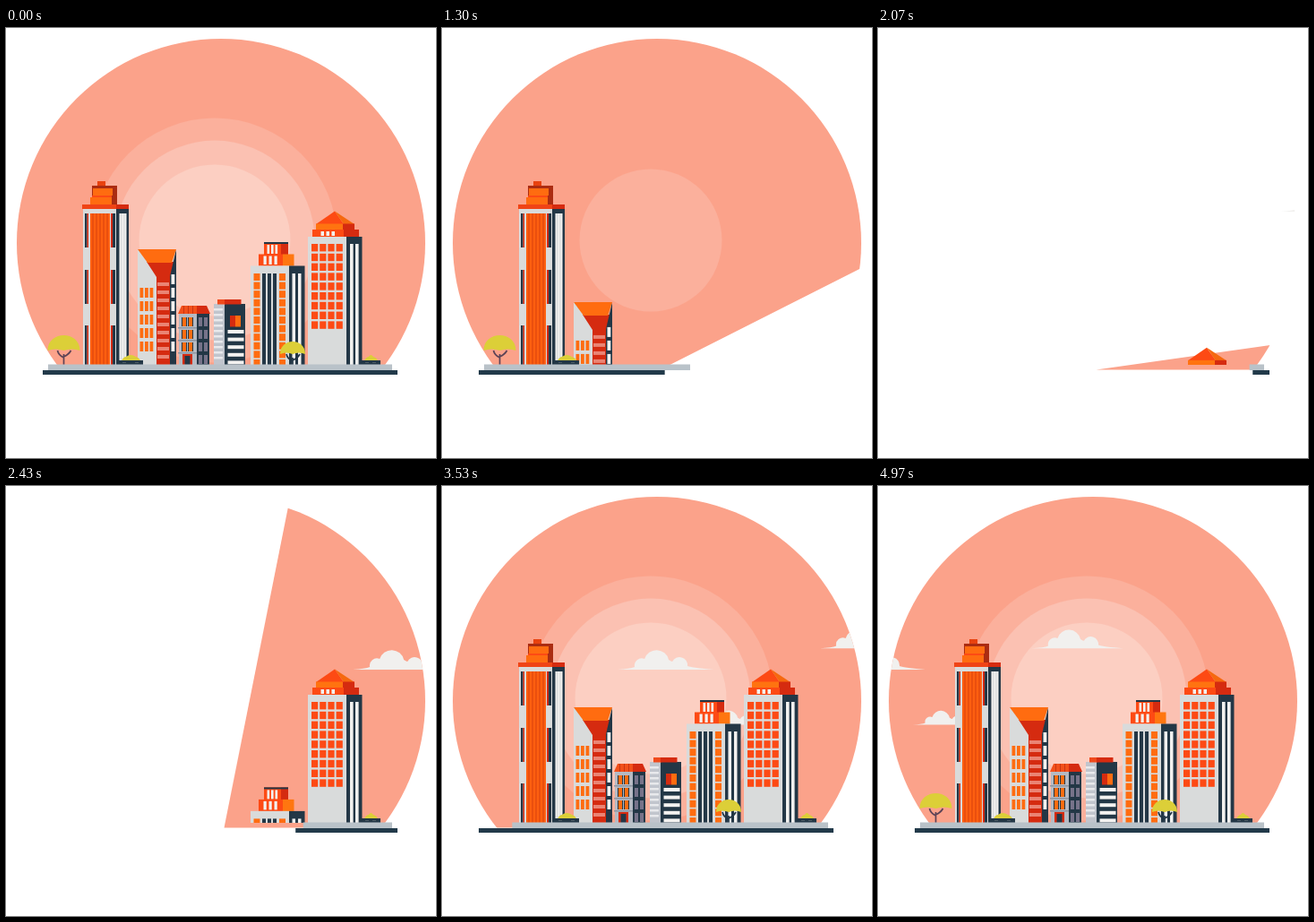
Recreate the animation shown at these times as an HTML page. Size 480x480 px, loop 5.01 s.

```html
<!DOCTYPE html>
<html lang="en">
<head>
<meta charset="utf-8">
<title>City skyline</title>
<style>
  html, body { margin: 0; width: 100%; height: 100%; overflow: hidden; background: #fff; }
  svg { display: block; width: 100vw; height: 100vh; }
</style>
</head>
<body>
<svg viewBox="0 0 480 480">
  <defs>
    <clipPath id="wedge"><path id="sweep"/></clipPath>
    <clipPath id="disc"><circle cx="240" cy="240" r="228"/></clipPath>
    <clipPath id="above"><rect width="480" height="376"/></clipPath>
    <path id="cloud" d="M0 23Q14 22 19 20A8 8 0 0 1 30 11A14 14 0 0 1 57 12Q60 14 61 14A9 9 0 0 1 78 19Q84 21 107 23Z"/>
  </defs>
  <g clip-path="url(#wedge)">
    <circle cx="240" cy="240" r="228" fill="#fba28a"/>
    <circle class="sun" cx="233" cy="237" fill="#fbb09c"/>
    <circle class="sun" cx="233" cy="237" fill="#fbc1b2"/>
    <circle class="sun" cx="233" cy="237" fill="#fccfc2"/>
  </g>
  <g clip-path="url(#disc)" fill="#f1f0ee">
    <g id="clouds">
      <use href="#cloud" y="182"/>
      <use href="#cloud" transform="translate(226 159.5) scale(.95)"/>
      <use href="#cloud" transform="translate(93 250) scale(.72)"/>
    </g>
  </g>
  <g id="city" clip-path="url(#above)"></g>
  <rect id="kerb" y="375.5" height="6.5" fill="#b9c2c9"/>
  <rect id="road" y="382" height="5" fill="#223a4a"/>
</svg>
<script>
const LOOP = 5010, TURN = 2000;
const navy = '#233746', grey = '#d9dbdb', white = '#f3f2f0', red = '#d52b10',
      flame = '#fd4a14', orange = '#ff6c10', maroon = '#ab2c12', lime = '#dccf38';
const $ = id => document.getElementById(id);

const rect = (fill, x, y, w, h) => `<rect x="${x}" y="${y}" width="${w}" height="${h}" fill="${fill}"/>`;
const poly = (fill, points) => `<polygon points="${points}" fill="${fill}"/>`;
const rows = (n, step, draw) => Array.from({ length: n }, (_, i) => draw(i * step)).join('');
const grid = (fill, xs, y, w, h, n, step) =>
  rows(n, step, d => xs.map(x => rect(fill, x, y + d, w, h)).join(''));

const columnTower = () =>
  rect('#e8420f', 102, 171, 9, 5) + rect(maroon, 96, 176, 28, 21) +
  rect(orange, 97, 179, 22, 8) + rect(orange, 94, 189, 24, 8) + rect(flame, 96, 187, 22, 2) +
  rect(grey, 86, 202, 37, 174) +
  [[207, 38], [270, 38], [332, 44]].map(([y, h]) =>
    rect(navy, 88, y, 2.5, h) + rect(red, 90.5, y, 1.5, h) +
    rect(red, 117, y, 2, h) + rect(navy, 119, y, 3, h)).join('') +
  rect('#fd5f10', 94, 207, 22, 169) +
  rows(5, 4, d => rect('#d8400c', 96.5 + d, 207, 1, 169)) +
  rect(navy, 123, 202, 14, 174) + rect(white, 126.5, 207, 8, 169) +
  rows(2, 3, d => rect('#c4c8cb', 128.5 + d, 207, .8, 169)) +
  rect('#f04416', 85, 197, 38, 5) + rect(red, 123, 197, 14, 5);

const foldTower = () =>
  rect(grey, 147, 247, 21, 129) +
  poly(red, '157,261 188,261 183,278 183,376 168,376 168,278') +
  poly(navy, '190,247 190,376 183,376 183,277') +
  poly(orange, '147,247 190,247 185,262 158,262') +
  grid('#ea8474', [169], 284, 13, 4, 10, 9) +
  grid(orange, [149.5, 155, 160.5], 290, 3.8, 11, 5, 15) +
  grid(white, [184.5], 275, 3.8, 11, 6, 15);

const townHouse = () =>
  rect('#b5bac3', 193, 319, 20, 57) + rect(navy, 213, 319, 14, 57) +
  poly('#f2501a', '196,310 213,310 213,319 192,319') +
  poly(red, '213,310 224,310 228,319 213,319') +
  rows(3, 5, d => rect('#c93512', 198 + d, 310, 1, 9)) +
  grid(navy, [196, 203], 323, 6, 10, 3, 14) +
  grid(orange, [197, 204], 323, 4, 10, 3, 14) +
  grid('#77738a', [215, 221], 323, 4, 10, 4, 14) +
  grid('#8e96a2', [192], 334, 21, 1.5, 3, 14) +
  rect(red, 197, 364, 11, 12) + rect(navy, 199.5, 366, 6, 10);

const officeBlock = () =>
  rect('#c1c5cd', 232, 308, 12, 68) + grid('#e8e9ec', [232], 313, 10, 2.5, 10, 6) +
  rect(navy, 244, 308, 23, 68) +
  rect('#f04a1c', 236, 303, 9, 5.5) + rect(red, 244, 303, 18.5, 5.5) +
  rect(red, 250, 321, 6, 12.5) + rect(orange, 256, 321, 6, 12.5) +
  grid(white, [247.5], 337, 18, 4, 5, 8.6);

const barTower = () =>
  rect(flame, 288, 239, 19, 14) + rect(red, 307, 239, 8, 14) + rect(navy, 288, 239, 27, 2) +
  grid(white, [291.5, 296, 300.5], 242, 2.6, 10, 1, 0) +
  rect(flame, 282, 252.5, 27, 13) + rect('#ff7610', 309, 252.5, 12.5, 13) +
  grid(white, [287.5, 293.5, 299.5], 254.5, 3.2, 9.5, 1, 0) +
  rect(grey, 273, 265.5, 43, 111) + rect(navy, 316, 265.5, 17.5, 111) +
  grid(orange, [276.5, 305], 274, 7, 8, 11, 9.6) +
  grid(navy, [286, 292, 298], 274, 4, 102, 1, 0) +
  grid(white, [319.5, 326], 274, 3.5, 102, 1, 0);

const peakTower = () =>
  poly(flame, '346,219 367,204.5 377,219') + poly('#f5690f', '367,204.5 389,219 377,219') +
  rect('#ff7310', 346, 218.5, 30, 7) + rect(red, 376, 218.5, 13, 7) +
  rect(flame, 342, 225, 35, 8) + rect(red, 377, 225, 17, 8) +
  grid(white, [351.5, 357.5, 363.5], 227, 3.5, 5, 1, 0) +
  rect(grey, 337, 233, 43, 143) + rect(navy, 380, 233, 17.5, 143) +
  grid(flame, [341, 350.2, 359.4, 368.6], 241, 7.2, 8.4, 9, 10.8) +
  grid(white, [384, 390], 241, 3.6, 135, 1, 0);

const tree = (x, top, w, h, trunk) =>
  `<path d="M${x} ${top + h + 4}V376M${x - 7} ${top + h}Q${x - 6} ${top + h + 5} ${x} ${top + h + 8}` +
  `M${x + 8} ${top + h}Q${x + 6} ${top + h + 4} ${x} ${top + h + 7}" fill="none" stroke="${trunk}" stroke-width="1.7"/>` +
  `<path d="M${x - w} ${top + h}C${x - w} ${top - h / 3} ${x + w} ${top - h / 3} ${x + w} ${top + h}` +
  `Q${x + w / 2} ${top + h - 3} ${x} ${top + h}Q${x - w / 2} ${top + h - 3} ${x - w} ${top + h}Z" fill="${lime}"/>`;

const bush = (x, w) =>
  `<path d="M${x + 4} 371.5Q${x + 6} 367 ${x + 9} 367Q${x + w / 2} 363 ${x + w - 8} 367Q${x + w - 4} 368 ${x + w - 3} 371.5Z" fill="${lime}"/>` +
  rect(navy, x, 371, w, 5) + grid('#4b5a66', [x + 5, x + w - 9], 373, 4, 1, 1, 0);

// leave = start of the way out, enter = start of the way in
const parts = [
  { art: peakTower(),   height: 172, leave: 300,  enter: 2033 },
  { art: barTower(),    height: 138, leave: 600,  enter: 2333 },
  { art: officeBlock(), height: 74,  leave: 885,  enter: 2480 },
  { art: townHouse(),   height: 67,  leave: 1030, enter: 2833 },
  { art: foldTower(),   height: 130, leave: 1180, enter: 2983 },
  { art: columnTower(), height: 206, leave: 1468, enter: 3150 },
  { art: bush(396, 22), height: 12,  leave: 250,  enter: 2067 },
  { art: bush(125, 28), height: 12,  leave: 1567, enter: 3167 },
  { art: tree(320, 350, 14, 14, navy),      base: 320, leave: 500,  enter: 2467 },
  { art: tree(64.5, 343, 18, 17, '#5d4356'), base: 64.5, leave: 1600, enter: 3533 }
];
$('city').innerHTML = parts.map(p => `<g>${p.art}</g>`).join('');
parts.forEach((p, i) => { p.node = $('city').children[i]; });

const suns = [
  { r: 136.5, leave: 1230, enter: 2420 },
  { r: 111.5, leave: 1130, enter: 2550 },
  { r: 84.5,  leave: 1030, enter: 2833 }
];
document.querySelectorAll('.sun').forEach((node, i) => { suns[i].node = node; });

// Straight line between two times, held outside them
const ramp = (t, t0, t1, a, b) => a + (b - a) * Math.min(1, Math.max(0, (t - t0) / (t1 - t0)));
const shown = (t, p, out, into) => t < TURN
  ? ramp(t, p.leave, p.leave + out, 1, 0)
  : ramp(t, p.enter, p.enter + into, 0, 1);

function strip(node, t, left, right, leave, done) {
  const full = right - left;
  const w = t < TURN ? ramp(t, leave, TURN, full, 0) : ramp(t, TURN, done, 0, full);
  node.setAttribute('x', t < TURN ? left : right - w);
  node.setAttribute('width', w);
}

function sector(from, to) {
  const at = deg => {
    const a = deg * Math.PI / 180;
    return `${243.5 + 600 * Math.cos(a)} ${381.5 - 600 * Math.sin(a)}`;
  };
  return to - from < .01 ? '' : `M243.5 381.5L${at(from)}A600 600 0 0 0 ${at(to)}Z`;
}

function draw(t) {
  $('sweep').setAttribute('d', t < TURN
    ? sector(ramp(t, 1235, 1678, 0, 180), 180)
    : sector(0, ramp(t, 2030, 2947, 0, 180)));

  for (const s of suns) s.node.setAttribute('r', s.r * shown(t, s, 170, 250));

  const leaving = t >= 100 && t < 1200;
  $('clouds').setAttribute('visibility', leaving || t >= TURN ? 'visible' : 'hidden');
  const x = t < TURN ? 462 - .343 * (t - 100) : 462 - .1737 * (t - TURN);
  $('clouds').setAttribute('transform', `translate(${x} 0)`);

  for (const p of parts) {
    const k = shown(t, p, 267, p.base ? 267 : 333);
    p.node.setAttribute('transform', p.base
      ? `translate(${p.base} 376) scale(${k}) translate(${-p.base} -376)`
      : `translate(0 ${p.height * (1 - k)})`);
    p.node.setAttribute('visibility', k > 0 ? 'visible' : 'hidden');
  }

  strip($('road'), t, 41, 437, 667, 3500);
  strip($('kerb'), t, 47, 431, 833, 3667);
}

const start = performance.now();
function tick() {
  draw((performance.now() - start) % LOOP);
  requestAnimationFrame(tick);
}
tick();
</script>
</body>
</html>
```
